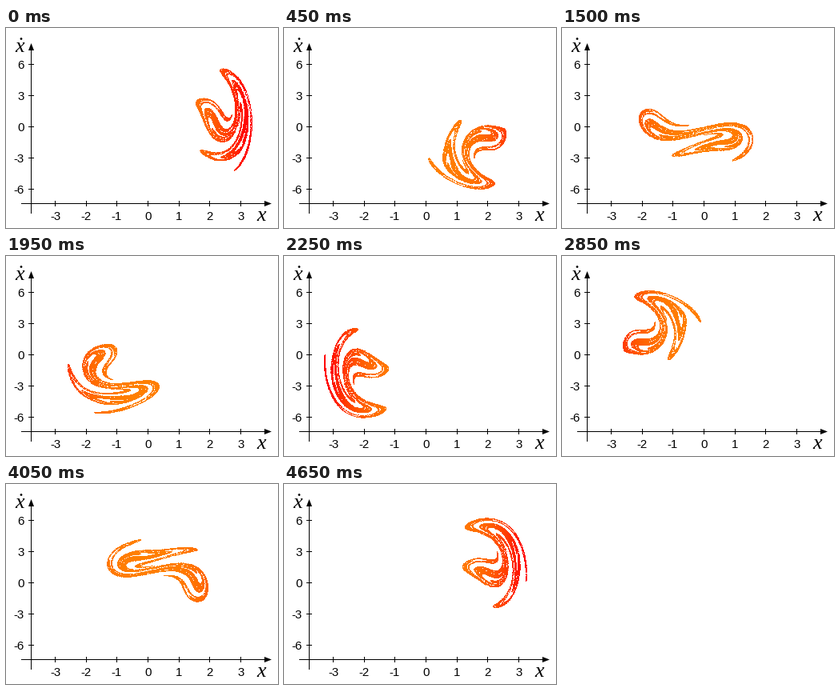
Write a matplotlib script that moves like this. It is 340 by 250 pixels and loops after 4800 ms.

```python
"""Stroboscopic section of the Ueda oscillator x'' + k x' + x^3 = B cos t."""
import numpy as np
import matplotlib.pyplot as plt
from matplotlib.animation import FuncAnimation

W, H = 340, 250
FRAMES, INTERVAL = 32, 150
X0, Y0 = 177, 122.5          # position of the point (0, 0)
SX, SY = 116 / 3, 13         # pixels per unit
AX_X, AX_Y = 31, 219         # pixel column and row of the axes

K, B = 0.05, 7.5
POINTS, WARMUP, SUBSTEPS = 18000, 20, 4
DT = 2 * np.pi / (FRAMES * SUBSTEPS)


def slope(t, s):
    x, v = s
    return np.array([v, B * np.cos(t) - K * v - x * x * x])


def rk4(t, s):
    a = slope(t, s)
    b = slope(t + DT / 2, s + DT / 2 * a)
    c = slope(t + DT / 2, s + DT / 2 * b)
    d = slope(t + DT, s + DT * c)
    return s + DT / 6 * (a + 2 * b + 2 * c + d)


def simulate():
    """Let a small cloud settle, then record one drive period."""
    rng = np.random.default_rng(7)
    s = rng.normal([[2.5], [0.0]], 0.2, (2, POINTS))
    for n in range(WARMUP * FRAMES * SUBSTEPS):
        s = rk4(n * DT, s)
    states = []
    for n in range(FRAMES * SUBSTEPS):
        if n % SUBSTEPS == 0:
            states.append(s)
        s = rk4(n * DT, s)
    return states


def paint(state):
    """One pixel per point, orange near x = 0 and red far out."""
    x, v = state
    col = np.clip(np.floor(X0 + SX * x).astype(int), 0, W - 1)
    row = np.clip(np.floor(Y0 - SY * v).astype(int), 0, H - 1)
    img = np.ones((H, W, 3))
    green = 0.5 * (1 - (np.abs(col - X0) / SX / 3.2) ** 3)
    img[row, col] = np.stack(
        [np.ones(POINTS), np.clip(green, 0, 1), np.zeros(POINTS)], axis=1)
    return img


states = simulate()

fig = plt.figure(figsize=(3.4, 2.5), dpi=100, facecolor="white")
PX = 72 / fig.dpi
ax = fig.add_axes([0, 0, 1, 1])
ax.axis("off")
picture = ax.imshow(paint(states[0]), extent=(0, W, H, 0),
                    interpolation="nearest", aspect="auto")
ax.set_xlim(0, W)
ax.set_ylim(H, 0)


def line(xs, ys):
    ax.plot(xs, ys, color="black", lw=PX, solid_capstyle="butt", snap=False)


def label(x, y, text, ha="center"):
    ax.text(x, y, text, ha=ha, va="baseline", fontsize=15 * PX,
            family="Liberation Sans")


def symbol(x, y):
    ax.text(x, y, "x", ha="center", va="baseline", fontsize=26 * PX,
            family="Liberation Serif", style="italic")


cx, cy = AX_X + 0.5, AX_Y + 0.5
line([19, 325], [cy, cy])
line([cx, cx], [26, 232])
ax.fill([332, 323, 323], [cy, cy - 3.5, cy + 3.5], color="black", lw=0)
ax.fill([cx, cx - 3.5, cx + 3.5], [19, 28, 28], color="black", lw=0)

for n in range(-3, 4):
    tx = round(X0 + SX * n) + 0.5
    line([tx, tx], [AX_Y - 3, AX_Y + 4])
    label(tx, 240, str(n))
for n in range(-6, 7, 3):
    ty = np.ceil(Y0 - SY * n) + 0.5
    line([AX_X - 3, AX_X + 4], [ty, ty])
    label(22.5, ty + 5.5, str(n), ha="right")

symbol(319, 241)
symbol(17, 30.5)
ax.add_patch(plt.Circle((19, 13.5), 1.4, color="black", lw=0))


def update(i):
    picture.set_data(paint(states[i]))
    return (picture,)


anim = FuncAnimation(fig, update, frames=FRAMES, interval=INTERVAL,
                     repeat=True, repeat_delay=0)
plt.show()
```
